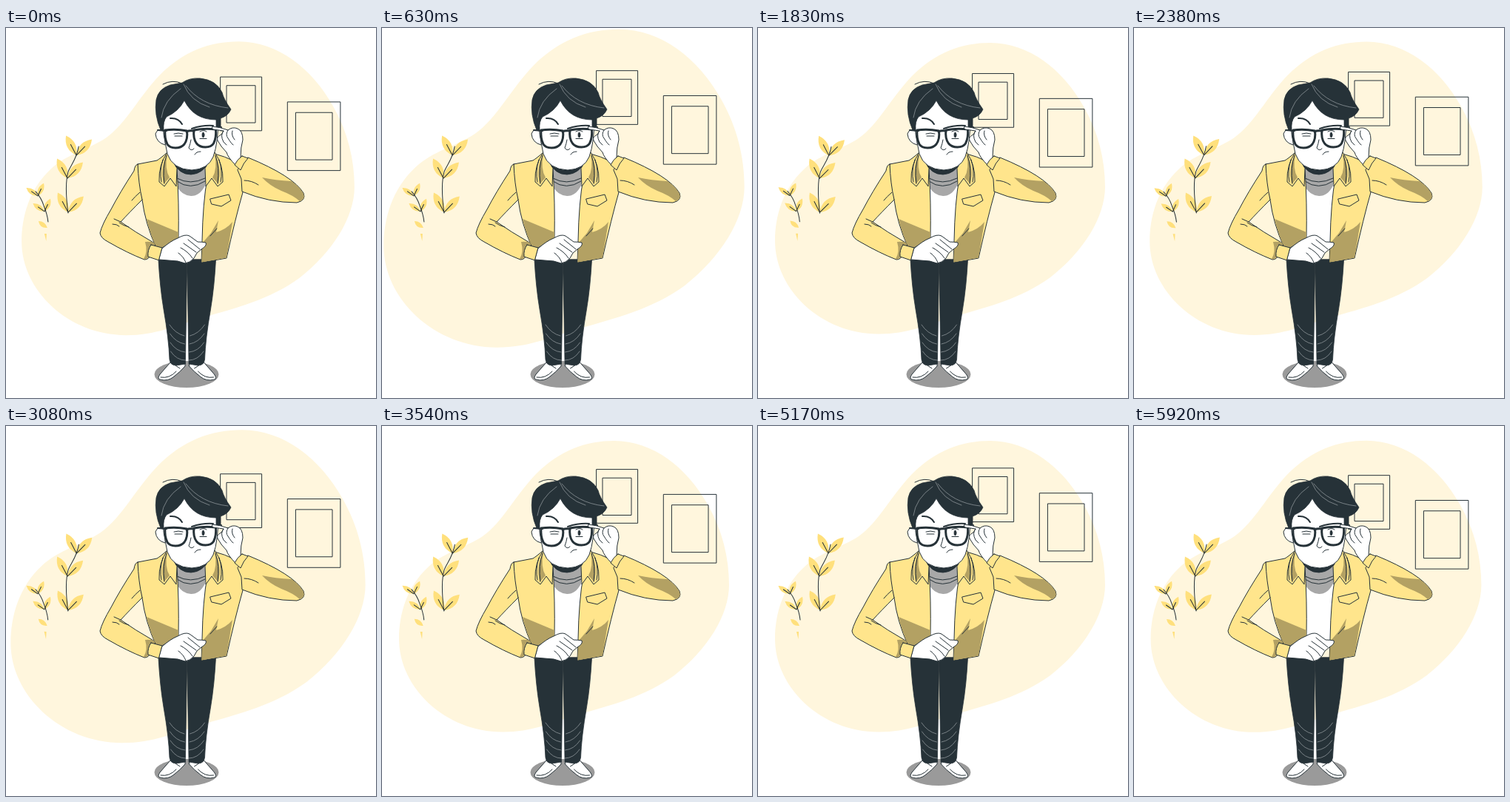
Recreate the animation shown at these times as an HTML page. Size 500 px wide and 500 px high, loop 5960 ms.

```html
<!DOCTYPE html>
<html lang="en">
<head>
<meta charset="utf-8">
<title>Man adjusting his glasses</title>
<style>
  html, body { margin: 0; width: 100%; height: 100%; overflow: hidden; background: #fff; }
  svg { display: block; width: 100%; height: 100%; }
  .ink, .skin, .coat, .dark { stroke: #263238; stroke-width: 1; stroke-linecap: round; stroke-linejoin: round; }
  .ink { fill: none; }
  .skin { fill: #fff; }
  .coat { fill: #ffe58c; }
  .dark { fill: #263238; stroke-width: .8; }
  .thick { stroke-width: 2; }
  .frame { stroke-width: 3; }
  .shade { fill: #b3a163; }
  .fine { fill: none; stroke: #8d9599; stroke-width: .8; stroke-linecap: round; }
  .leaf { fill: #ffe07c; }
</style>
</head>
<body>
<svg viewBox="0 0 500 500">
  <path id="blob" fill="#fff6dd" d="M314 20C366 20 412 56 440 106C460 141 469 178 469 215C469 255 440 302 395 337C355 366 310 377 265 390C228 401 203 413.5 163 413.5C85 413.5 23 353 23 288C23 255 33 218 62 191C84 170 112 165 136 149C163 130 180 94 208 65C240 33 275 20 314 20Z"/>

  <g id="pictures" class="ink">
    <path d="M290 66.8H345.6V139.5H290ZM298.4 78.4H337V128.7H298.4Z"/>
    <path d="M380.7 100.6H451.9V193.3H380.7ZM391.8 114.9H441V178.8H391.8Z"/>
  </g>

  <g id="plants">
    <path id="leaves" class="leaf"/>
    <path class="leaf" d="M44 261Q53 261 56 270Q46 271 44 261ZM52 278H55L54.5 288Z"/>
    <path class="ink" d="M84 250C81 228 80 208 84 194C88 184 95 178 98 160M40 221Q48 230 51 240Q56 252 57 262"/>
    <path id="veins" class="ink"/>
  </g>

  <ellipse cx="244" cy="468" rx="43.5" ry="18" fill="#9a9a9a"/>

  <g id="leg">
    <path class="skin" d="M222 452L208 468Q204 474 208 475Q219 478 227 471Q235 465 242 457V452Z"/>
    <path class="ink" d="M209 472Q221 474 230 464M229 456L235 460"/>
    <path class="dark" d="M206 313Q208 350 213 380Q220 420 221 448Q222 456 230 456L242.4 454L244.6 325V313Z"/>
    <path class="fine folds"/>
  </g>
  <use href="#leg" transform="matrix(-1 0 0 1 489.5 0)"/>

  <path class="skin" d="M228 184H272L267 292Q255 300 232 288Z"/>
  <path fill="#a8a8a8" d="M229 183H271L269 213Q262 227 250 227Q237 226 231 214Z"/>
  <path class="ink" d="M231 203Q249 213 269 203M231 207Q249 220 269 207"/>

  <g id="jacket">
    <path class="coat" d="M282 170Q312 178 322 191L320 222Q310 257 298 311L264 317L265 288Q266 235 272 203Z"/>
    <path class="shade" d="M264.5 316.5L265 291L277 277L287 260L284 276Q298 272 306 262L298 310.5Z"/>
    <path class="coat" d="M327 175Q388 200 402 223Q406 233 393 236Q355 236 319 221L318 204L313 192Z"/>
    <path class="shade" d="M346 202Q364 206 386 207Q398 216 402 224Q405 231 397 234Q388 226 372 220Q356 213 346 202Z"/>
    <path class="ink" d="M322 206Q332 206 341 212M276 281L285 271"/>
    <path class="coat" d="M276 231L301 225L304 233L291 241L278 238Z"/>

    <path class="coat" d="M218 168Q209 176 204 179L178 184Q176 212 184 232Q188 264 203 297H210L233 285Q234 235 231 190Z"/>
    <path class="shade" d="M190 258L233 276V284L210 296.5H203Q195 278 190 258Z"/>
    <path class="coat" d="M178 184Q174 185 173 193Q154 222 142 245Q130 265 127 277Q128 284 138 289Q164 304 187 313Q193 313 196 306L201 294Q202 291 196 288Q175 276 155 262Q166 250 184 232Q179 210 178 184Z"/>
    <path class="shade" d="M188 289Q203 288 201 294L195 307Q191 313 186 312Q192 303 188 289Z"/>
    <path class="ink" d="M155 262L146 258M153 263Q158 267 166 269M144 265Q150 265 153 268M181 222Q174 228 170 233"/>
    <path class="coat" d="M196 293L211 297L207 314L192 309Q191 300 196 293Z"/>
  </g>

  <g id="lapel">
    <path class="coat" d="M218 168Q206 185 207 208L214 214L222 203L230 214L231 190Z"/>
    <path class="shade" d="M218 171Q208 188 213 211L221 202Q214 190 218 171Z"/>
    <path class="ink" d="M217 172Q211 188 214 210M212 178Q207 193 210 208"/>
  </g>
  <use href="#lapel" transform="matrix(-1 0 0 1 500 0)"/>

  <g id="head">
    <path class="dark" d="M226 180Q233 198 250 198Q267 197 274 180Z"/>
    <path class="skin" d="M214 140Q205 134 202 143Q203 155 215 158Z"/>
    <path class="skin" d="M211 120Q212 145 218 170Q225 191 251 192Q273 191 280 174Q287 155 287 120Q280 90 242 92Q216 95 211 120Z"/>
    <path class="dark" d="M209 138Q200 117 203 97Q206 82 222 77L238 74Q248 67 262 68Q284 70 292 87Q294 96 304 110Q300 119 290 122V134H284V124Q254 124 241 98Q233 113 217 120Q212 126 213 138Z"/>
    <path class="ink" d="M212 76Q225 69 238 75"/>
    <path class="fine" d="M243 78Q263 104 300 108M240 76Q249 99 275 107M236 82Q213 98 210 121"/>
    <path class="ink thick" d="M222 122Q233 121 238 130M251 136Q266 131 280 132M205 138L217 139M283 137L291 134"/>
    <path id="lens" class="ink frame" d="M215 138Q230 136 244.5 139Q246 150 241 157Q237 162 229 162Q221 162 218 157Q214 149 215 138Z"/>
    <use href="#lens" transform="matrix(-1 0 0 1 498.5 -1)"/>
    <path class="ink frame" d="M244 140Q248 138 254 139"/>
    <path class="ink" d="M227 143Q233 141 239 143M228 146H238M262 140Q267 137 271 140M262 149.5H271M250 151Q249 157 247 162Q250 167 254 163M255 171Q257 167 263 167"/>
    <ellipse class="dark" cx="266.5" cy="144.5" rx="1.5" ry="3.4"/>
  </g>

  <g id="hands">
    <path class="skin" d="M279 133Q290 134 300 138Q306 133 313 136Q320 139 320 151Q317 161 317 175L310 185Q300 175 298 168Q290 160 286 152Q284 147 291 144L294 139L280 137Q277 135 279 133Z"/>
    <path class="ink" d="M300 138Q296 144 300 149Q305 157 307 158M294 139Q289 145 294 154L298 158M306 139Q304 145 309 151"/>
    <path class="coat" d="M319 173L327 176Q321 182 317 192L309 185Q312 178 319 173Z"/>
    <path class="skin" d="M211 298Q222 288 232 284Q242 278 248 281L259 289Q265 289 270 290Q272 294 264 299Q257 303 254 311Q249 317 242 318L232 315L207 313Z"/>
    <path class="ink" d="M246 286L262 299M240 291L257 303M236 297Q246 302 252 311M233 304Q240 309 243 317"/>
  </g>
</svg>
<script>
const LOOP = 5960, CYCLE = 6000, LEAD = 50;
const find = selector => document.querySelector(selector);

// A pair of leaves grows from every node; tilt and spread are degrees from upright.
const plants = [
  { nodes: [[95, 172], [83, 203], [84, 249]], tilt: 8, spread: 36, length: 30 },
  { nodes: [[43, 227], [52, 248]], tilt: -15, spread: 40, length: 19 }
];

function growLeaf([x, y], degrees, length) {
  const angle = degrees * Math.PI / 180;
  const at = (along, aside) => [
    x + length * (along * Math.sin(angle) + aside * Math.cos(angle)),
    y - length * (along * Math.cos(angle) - aside * Math.sin(angle))
  ];
  return {
    shape: `M${x} ${y}Q${at(.5, .38)} ${at(1, 0)}Q${at(.5, -.38)} ${x} ${y}Z`,
    vein: `M${x} ${y}L${at(.55, 0)}`
  };
}

const leaves = plants.flatMap(({ nodes, tilt, spread, length }) =>
  nodes.flatMap(node => [-1, 1].map(side => growLeaf(node, tilt + side * spread, length))));
find("#leaves").setAttribute("d", leaves.map(leaf => leaf.shape).join(""));
find("#veins").setAttribute("d", leaves.map(leaf => leaf.vein).join(""));

const folds = Array.from({ length: 4 }, (_, i) => `M${221 + i / 2} ${401 + 12 * i}q8 12 20 ${15 - i}`);
find(".folds").setAttribute("d", folds.join(""));

// Straight ramp between a and b as p runs from p0 to p1, held outside.
const ramp = (p, p0, p1) => Math.min(1, Math.max(0, (p - p0) / (p1 - p0)));
const pulse = (p, from, peak, to) => ramp(p, from, peak) - ramp(p, peak, to);
const triangle = p => 1 - Math.abs(2 * p - 1);

function draw(ms) {
  const time = (ms % LOOP) * CYCLE / LOOP + LEAD;
  const beat = time % CYCLE / CYCLE;
  const sway = time % 1500 / 1500;
  const scale = 1 + .1 * (pulse(beat, 0, .1, .3) + pulse(beat, .4, .5, .6));
  const angle = 2 * triangle((sway + .25) % 1) - 1;
  find("#blob").setAttribute("transform", `translate(246 216.75) scale(${scale}) translate(-246 -216.75)`);
  find("#pictures").setAttribute("transform", `translate(0 ${-10 * triangle(sway)})`);
  find("#plants").setAttribute("transform", `rotate(${angle} 71.5 220)`);
}

const start = performance.now();
function tick() {
  draw(performance.now() - start);
  requestAnimationFrame(tick);
}
tick();
</script>
</body>
</html>
```
